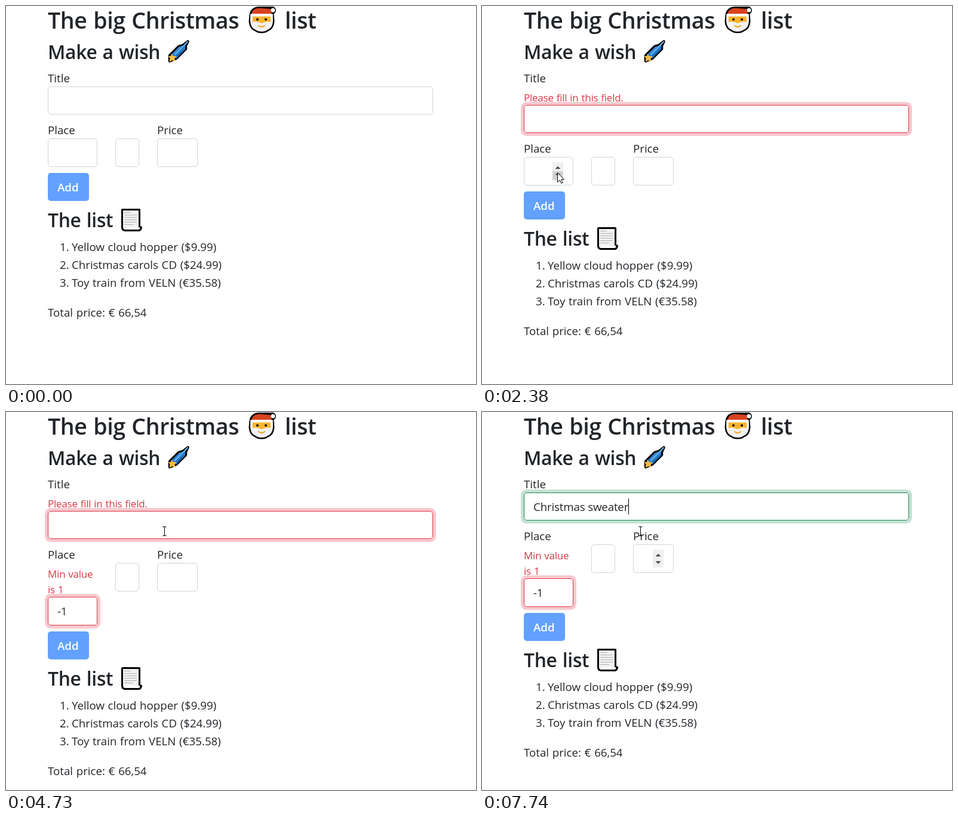
Recreate the animation shown at these times as an HTML page. Size 787 px wide and 634 px high, loop 8000 ms.

```html
<!DOCTYPE html>
<html lang="en">
<head>
<meta charset="utf-8">
<title>The big Christmas list</title>
<style>
  html, body { margin: 0; width: 100%; height: 100%; overflow: hidden; background: #fff; }
  svg { display: block; }
  text { font: 18.7px 'Open Sans', 'Noto Sans', sans-serif; word-spacing: .8px; fill: #212529; white-space: pre; }
  .h1 { font-size: 37.6px; font-weight: 600; letter-spacing: -.4px; word-spacing: 1.2px; }
  .h2 { font-size: 31.8px; font-weight: 600; letter-spacing: -.3px; word-spacing: 1.2px; }
  .error { font-size: 17px; letter-spacing: -.25px; fill: #dc3545; }
  .value { letter-spacing: -.15px; word-spacing: 0; }
  .add { font-weight: 600; fill: #fff; }
  .field { fill: #fff; stroke: #ced4da; }
  .ring { fill: none; stroke: #fff; stroke-width: 5; }
  .caret { fill: #000; }
</style>
</head>
<body>
<svg width="787" height="634" viewBox="0 0 787 634">
  <defs>
    <g id="spinner">
      <path d="M0 231h18v30h-18z" fill="#f0f0f0"/>
      <path d="M4.5 242.3l4.5-4.6 4.5 4.6zM4.5 250.2l4.5 4.6 4.5-4.6z" fill="#484848"/>
    </g>
  </defs>

  <text class="h1" x="70" y="38">The big Christmas</text>
  <text class="h1" x="467" y="38">list</text>
  <g id="santa">
    <path d="M410 15C411 7 417 3.5 424 3.5H444A4 4 0 1 1 447 11L446 14 447 26Q446 37 438 40Q434 43 428 43Q422 43 418 40Q410 37 409 26Z" stroke="#000" stroke-width="5" stroke-linejoin="round"/>
    <path d="M411 14C412 7 417 3.5 424 3.5L443 5 445 14Z" fill="#d8431f"/>
    <circle cx="447" cy="7" r="3.5" fill="#fff"/>
    <path d="M409 17H447V26Q446 37 438 40Q434 43 428 43Q422 43 418 40Q410 37 409 26Z" fill="#f2f2f2"/>
    <path d="M413 17H443V27Q436 25 428 29Q420 25 413 27Z" fill="#fcb42f"/>
    <rect x="409" y="13" width="38" height="4.5" rx="2" fill="#fff"/>
    <circle cx="421" cy="22.5" r="2"/><circle cx="435" cy="22.5" r="2"/>
    <path d="M423 33Q428 37 433 33" fill="none" stroke="#f3a51f" stroke-width="2.2" stroke-linecap="round"/>
  </g>

  <text class="h2" x="70" y="89">Make a wish</text>
  <g id="comet" stroke-linejoin="round" stroke-linecap="round">
    <path d="M274 83L289 68 296 66 304.5 59.5 301 67 301 72 285 88 274 92.5Z" stroke="#000" stroke-width="4.5"/>
    <path d="M276 82L290 68 296 67 304.5 59.5 300 67 300 73 285 88Z" fill="#2b7fcf"/>
    <path d="M283 81L304 60" stroke="#69b5ef" stroke-width="2"/>
    <path d="M287 84L299 73" stroke="#145a9c" stroke-width="2"/>
    <path d="M277 80L280 84 285.5 84 282.5 88 283.5 93 278.5 91 273.5 93.5 274.5 88 272 84 276 84Z" fill="#fdbb3a"/>
  </g>

  <text x="70" y="128">Title</text>
  <text id="titleError" class="error" x="70" y="160">Please fill in this field.</text>
  <g id="title">
    <rect class="ring" x="67.5" y="132.5" width="650" height="52" rx="7"/>
    <rect class="field" x="70.5" y="135.5" width="644" height="46" rx="4.5"/>
    <text class="value" x="86" y="166"></text>
    <rect class="caret" x="86" y="145" width="1" height="27"/>
  </g>

  <g id="row">
    <text x="70" y="215">Place</text>
    <text x="253" y="215">Price</text>
    <g id="placeError">
      <text class="error" x="70" y="247">Min value</text>
      <text class="error" x="70" y="273">is 1</text>
    </g>
    <rect class="field" x="183.5" y="222.5" width="39" height="47" rx="4.5"/>
    <rect class="field" x="253.5" y="222.5" width="67" height="47" rx="4.5"/>
    <use id="priceSpin" href="#spinner" x="286"/>
    <g id="place">
      <rect class="ring" x="67.5" y="219.5" width="88" height="53" rx="7"/>
      <rect class="field" x="70.5" y="222.5" width="82" height="47" rx="4.5"/>
      <g id="placeSpin">
        <use href="#spinner" x="118"/>
        <g id="downHot">
          <path d="M118 246h18v15h-18z" fill="#d2d2d2"/>
          <path d="M122.5 250.2l4.5 4.6 4.5-4.6z" fill="#484848"/>
        </g>
      </g>
      <text class="value" x="86" y="253"></text>
      <rect class="caret" x="86" y="233" width="1" height="27"/>
    </g>
  </g>

  <g id="rest">
    <rect x="70" y="280" width="69" height="47" rx="5" fill="#62a1fe"/>
    <text class="add" x="86" y="311">Add</text>
    <text class="h2" x="70" y="371">The list</text>
    <g id="scroll">
      <path d="M194.500 341.500H223.500V371H226.500Q226 376.500 222 376.500H199Q194.500 376 194.500 371Z" fill="#f2f2f2" stroke="#000" stroke-width="3" stroke-linejoin="round"/>
      <path d="M198 346.500h11M198 350.500h21M198 354.500h21M198 358.500h21M198 362.500h21M198 366.500h15" stroke="#b0b0b0"/>
      <path d="M201 372.500H224" stroke="#fff" stroke-width="3"/>
    </g>
    <text x="90" y="411">1.</text><text x="110" y="411">Yellow cloud hopper ($9.99)</text>
    <text x="90" y="441">2.</text><text x="110" y="441">Christmas carols CD ($24.99)</text>
    <text x="90" y="471">3.</text><text x="110" y="471">Toy train from VELN (€35.58)</text>
    <text x="70" y="521">Total price: € 66,54</text>
  </g>

  <g id="pointer">
    <circle id="click" r="15" fill="#ff0" fill-opacity=".5"/>
    <path id="arrow" d="M.5 .5V16.5L4.3 13 6.8 18.5 9.2 17.5 6.8 12H11.5Z" fill="#fff" stroke="#000"/>
    <path id="beam" d="M-2.5 -7.5H3.5M-2.5 7.5H3.5M.5 -7.5V7.5" fill="none" stroke="#000"/>
  </g>
</svg>

<script>
const LOOP = 8000, TITLE_BAD = 1550, PLACE_FOCUS = 2720, PLACE_BAD = 3360, TYPING = 4780;
const WISH = 'Christmas sweater';
const keyTimes = [TYPING, 4920, 5070, 5170, 5270, 5670, 5870, 5970, 6070,
  6270, 6470, 6740, 7070, 7270, 7340, 7610, 7740];

// Border and ring colours
const plain = [[206, 212, 218], [255, 255, 255]];
const focus = [[134, 183, 254], [194, 219, 254]];
const bad = [[220, 53, 69], [247, 200, 206]];
const good = [[25, 135, 84], [197, 225, 212]];

const titleStates = [[0, plain], [930, focus], [TITLE_BAD, bad], [TYPING, good]];
const placeStates = [[0, plain], [PLACE_FOCUS, focus], [PLACE_BAD, bad]];
const titleCaret = [[930, 1460], [4250, 4730], [TYPING, LOOP]];
const placeCaret = [[PLACE_FOCUS, 3250]];
const clicks = [[800, 1000], [1480, 1620], [PLACE_FOCUS, 2860], [3150, 3360], [4180, 4320]];
const path = [[70, 649, 533], [800, 243, 165], [1130, 243, 165], [1480, 518, 306],
  [1550, 518, 306], [1690, 436, 310], [2380, 126, 279], [2930, 126, 279],
  [3150, 544, 365], [3630, 544, 365], [4180, 265, 200]];

const $ = id => document.getElementById(id);
const show = (el, on) => { el.style.display = on ? '' : 'none'; };
const shift = (el, y) => el.setAttribute('transform', `translate(0 ${y})`);
const during = (spans, t) => spans.some(([a, b]) => t >= a && t < b);
const lerp = (a, b, k) => a + (b - a) * k;
const mix = (a, b, k) => `rgb(${a.map((v, i) => Math.round(lerp(v, b[i], k)))})`;

function pointerAt(t) {
  const i = path.findIndex(p => p[0] > t);
  if (i < 0) return path[path.length - 1].slice(1);
  const a = path[Math.max(i - 1, 0)], b = path[i];
  const u = Math.max(0, (t - a[0]) / (b[0] - a[0]));
  const k = u * u * (3 - 2 * u);
  return [Math.round(lerp(a[1], b[1], k)), Math.round(lerp(a[2], b[2], k))];
}

function drawField(el, t, states, value, caretOn) {
  const [ring, box, label, caret] = ['.ring', '.field', '.value', '.caret'].map(s => el.querySelector(s));
  const i = states.filter(s => s[0] <= t).length - 1;
  const [start, to] = states[i], from = states[Math.max(i - 1, 0)][1];
  const k = Math.min(1, (t - start) / 140 + .3);
  box.style.stroke = mix(from[0], to[0], k);
  ring.style.stroke = mix(from[1], to[1], k);
  show(ring, i > 0);
  if (label.textContent !== value) label.textContent = value;
  caret.setAttribute('x', 86 + (value ? Math.floor(label.getComputedTextLength()) : 0));
  show(caret, caretOn);
}

function draw(t) {
  const titleShift = t >= TITLE_BAD && t < TYPING ? 31 : 0;
  const placeShift = t >= PLACE_BAD ? 57 : 0;
  shift($('title'), titleShift);
  shift($('row'), titleShift);
  shift($('place'), placeShift);
  shift($('rest'), titleShift + placeShift);
  show($('titleError'), titleShift);
  show($('placeError'), placeShift);

  drawField($('title'), t, titleStates,
    WISH.slice(0, keyTimes.filter(k => k <= t).length), during(titleCaret, t));
  drawField($('place'), t, placeStates, t >= PLACE_FOCUS ? '-1' : '', during(placeCaret, t));

  // The screen was sampled about 14 times a second
  const [x, y] = pointerAt(Math.floor(t / 70) * 70);
  const over = (l, top, r, bottom) => t >= 70 && x >= l && x < r &&
    y >= top + titleShift && y < bottom + titleShift;
  const placeFocused = t >= PLACE_FOCUS && t < PLACE_BAD;
  show($('priceSpin'), over(253, 195, 321, 270));
  show($('placeSpin'), placeFocused || !placeShift && over(70, 195, 153, 270));
  show($('downHot'), over(118, 246, 136, 261));

  const overSpinner = over(118, 231, 136, 261) || over(286, 231, 304, 261);
  const overInput = over(70, 135, 715, 182) ||
    [[70, 153], [183, 223], [253, 321]].some(([l, r]) => over(l, 222, r, 270));
  const beam = t >= TYPING || overInput && !overSpinner;
  show($('pointer'), t >= 70);
  $('pointer').setAttribute('transform', `translate(${x} ${y})`);
  show($('beam'), beam);
  show($('arrow'), !beam);
  show($('click'), during(clicks, t));
}

function tick() {
  draw(performance.now() % LOOP);
  requestAnimationFrame(tick);
}
tick();
</script>
</body>
</html>
```
